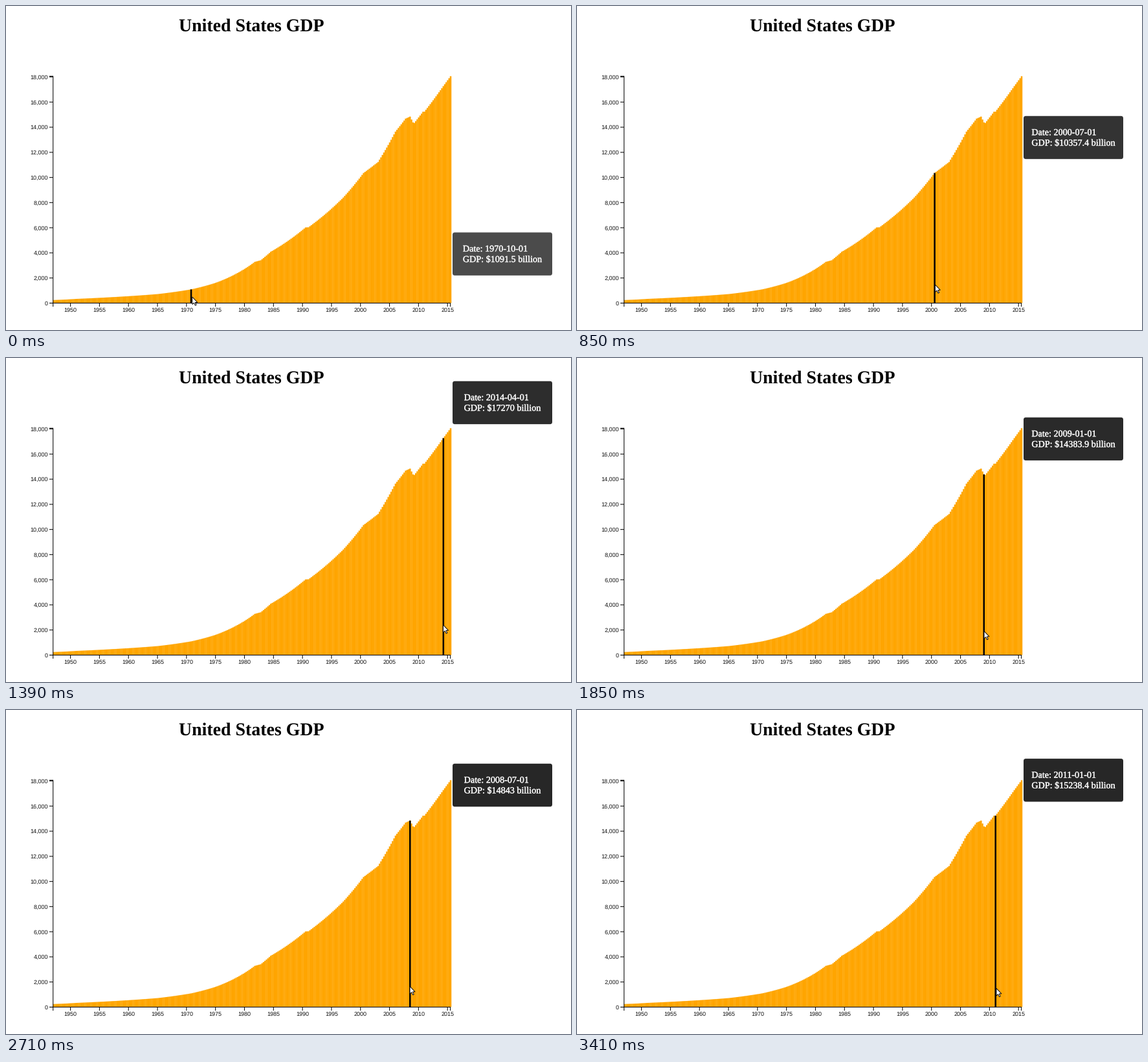
Recreate the animation shown at these times as a matplotlib script. Size 873 px wide and 500 px high, loop 3480 ms.

```python
import numpy as np
import matplotlib.pyplot as plt
from matplotlib.animation import FuncAnimation
from matplotlib.collections import PolyCollection
from matplotlib.patches import FancyBboxPatch, Polygon, Rectangle
from matplotlib.patheffects import withStroke

W, H, DPI = 873, 500, 100
LOOP, TICK, STEPS = 3480, 20, 45
PX = 72 / DPI                             # one pixel in points
BASE, UNIT = 458.5, 0.01939               # zero line, pixels per billion
LEFT, PITCH, BAR, COUNT = 72, 2.24, 2.5, 275
YEAR0, YEAR_PX, AXIS_X = 1947, 8.963, 72.7
TIP, TIP_MID = 14.15, 767                 # tooltip font size and centre
INK = "#111111"

# Turning points (quarter, value); growth is steady between them
BENDS = [
    (0, 243), (7, 275), (16, 336), (40, 471), (72, 719), (95, 1091.5),
    (112, 1616), (133, 2799.9), (139, 3283.5), (143, 3407.8), (150, 4087.4),
    (174, 6023), (176, 6035), (200, 8402), (214, 10357.4), (224, 11230),
    (236, 13649), (243, 14685), (246, 14843), (248, 14383.9), (249, 14340.4),
    (255, 15230.2), (256, 15238.4), (269, 17270), (274, 18060.2)]
quarters, values = np.array(BENDS).T
gdp = np.exp(np.interp(np.arange(COUNT), quarters, np.log(values))).round(1)

# Pointer path: step, hovered bar, offset from the bar, height
PATH = np.array([
    (0, 95, 2, 449), (4, 112, 4, 442), (6, 133, 5, 438.5), (7, 150, 4, 437),
    (11, 214, 1, 430), (14, 255, 1, 423), (18, 269, 0, 412), (21, 263, 0, 417),
    (24, 248, .5, 421.5), (26, 247, 1, 425), (27, 247, 1, 425),
    (31, 255, 1, 424), (32, 255, 1, 424), (35, 246, 0, 426.5),
    (37, 241, 0, 428), (39, 241, 0, 428), (44, 256, 1.5, 429.5)]).T
ARROW = np.array([(0, 0), (0, 11.5), (2.6, 9.1), (4.6, 13.2), (6.3, 12.4),
                  (4.4, 8.4), (8, 8.4)])

plt.rcParams["text.hinting"] = "none"
fig = plt.figure(figsize=(W / DPI, H / DPI), dpi=DPI, facecolor="white")
ax = fig.add_axes([0, 0, 1, 1])
ax.set(xlim=(0, W), ylim=(H, 0))
ax.axis("off")


def level(value):
    return BASE - UNIT * value


def bar_x(q):
    return LEFT + PITCH * q


def label(x, y, text, size, font="Liberation Sans", **kw):
    return ax.text(x, y, text, fontsize=size * PX, family=font, **kw)


def draw_bars():
    boxes = []
    for q, value in enumerate(gdp):
        x0, x1, top = bar_x(q), bar_x(q) + BAR, level(value)
        boxes.append([(x0, BASE), (x0, top), (x1, top), (x1, BASE)])
    ax.add_collection(PolyCollection(boxes, facecolors="#ffa500", linewidths=0,
                                     snap=False, zorder=1), autolim=False)


def draw_axes():
    line = dict(colors=INK, linewidths=1.1 * PX, snap=False, zorder=3)
    peak = level(gdp[-1])
    ax.vlines(AXIS_X, peak, BASE, **line)
    ax.hlines(BASE, 67, 687, **line)
    ax.hlines(peak, 67, 73, **line)
    for value in range(0, 18001, 2000):
        y = level(value)
        ax.hlines(y, 67, 73, **line)
        label(64.8, y + 3.2, f"{value:,}", 9, ha="right", color=INK)
    ax.vlines([AXIS_X, 686.5], BASE, 464, **line)
    for year in range(1950, 2016, 5):
        x = AXIS_X + YEAR_PX * (year - YEAR0)
        ax.vlines(x, BASE, 464, **line)
        label(x, 472.3, str(year), 9, ha="center", color=INK)


label(379.3, 39, "United States GDP", 27.9, "Liberation Serif",
      weight="bold", ha="center", color="black")
draw_bars()
draw_axes()

marker = ax.add_patch(Rectangle((0, 0), BAR, 1, fc="black", lw=0, snap=False,
                                zorder=4))
box = ax.add_patch(FancyBboxPatch((690, 0), 154, 66.4, lw=0, snap=False, zorder=5,
                                  boxstyle="round,pad=0,rounding_size=3.5"))
lines = [label(0, 0, "", TIP, "Liberation Serif", color="#f5f5f5", zorder=6,
               path_effects=[withStroke(linewidth=0.35 * PX, foreground="#f5f5f5")])
         for _ in range(2)]
cursor = ax.add_patch(Polygon(ARROW, fc="white", ec="black", lw=0.9 * PX,
                              joinstyle="miter", zorder=7))


def tip_width(number):
    """Width of the value line: fixed words, digits and decimal point."""
    digits = sum(c.isdigit() for c in number)
    return TIP * (5.89 + 0.5 * digits + 0.25 * ("." in number))


def update(frame):
    step = int((frame * TICK + 16) * STEPS / LOOP)
    spot, dx, y = (np.interp(step, PATH[0], row) for row in PATH[1:])
    q = int(round(spot))
    top = level(gdp[q])
    marker.set_bounds(bar_x(q), top, BAR, BASE + 0.5 - top)
    cursor.set_xy(ARROW + (bar_x(q) + 1 + dx, y))

    box_y = top - 87.9
    box.set_y(box_y)
    # The tooltip darkens as it fades in
    box.set_facecolor([(38 + 37 * np.exp(-step / 10.5)) / 255] * 3)
    number = f"{gdp[q]:.6g}"
    lines[0].set_text(f"Date: {YEAR0 + q // 4}-{1 + 3 * (q % 4):02d}-01")
    lines[1].set_text(rf"GDP: \${number} billion")
    for n, line in enumerate(lines):
        line.set_position((TIP_MID - tip_width(number) / 2, box_y + 29.5 + 16.2 * n))
    return marker, cursor, box, *lines


anim = FuncAnimation(fig, update, frames=LOOP // TICK, interval=TICK, repeat=True)
plt.show()
```
